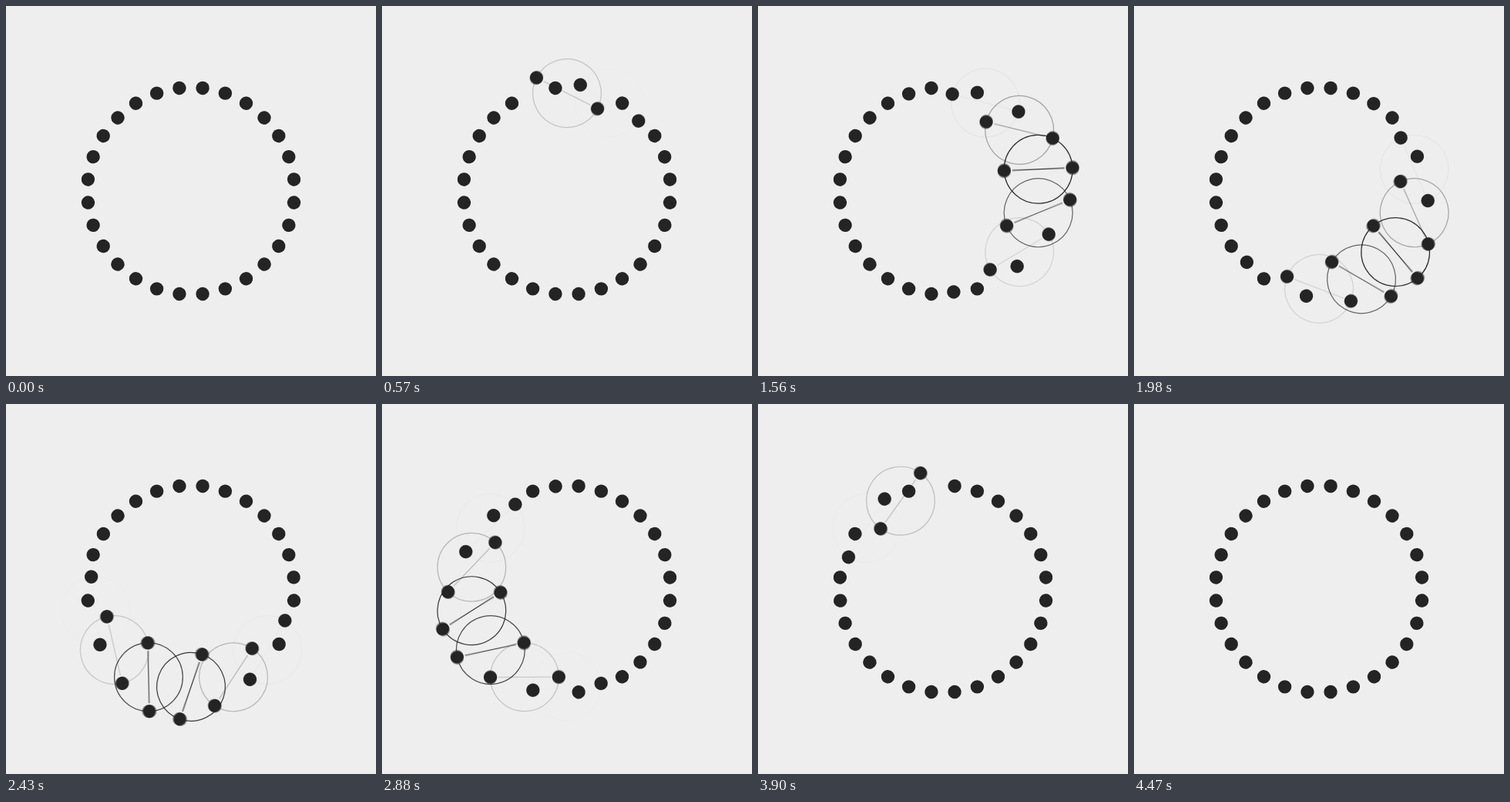
An HTML page with a canvas for the animation above (5.17 s loop, 480 by 480 pixels).

```html
<!DOCTYPE html>
<html>
<head>
<meta charset="utf-8">
<title>Swapping dots</title>
<style>
  html, body { margin: 0; width: 100%; height: 100%; overflow: hidden; background: #eee; }
  canvas { display: block; }
</style>
</head>
<body>
<canvas id="stage" width="480" height="480"></canvas>
<script>
const SIZE = 480, INK = '#242424', PAPER = '#eee';
const LOOP = 5170, STEP = 30, LAST = 4470;       // ms
const PAIRS = 14, TURN = 1800, STAGGER = 2700 / (PAIRS - 1);
const SHUTTER = 18, SAMPLES = 6;                 // motion blur
const RING = 134.4, DOT = 8.7;
const HALF_ANGLE = 3 * Math.PI / 28;             // paired dots are three places apart
const ORBIT = RING * Math.sin(HALF_ANGLE);
const HUB = RING * Math.cos(HALF_ANGLE);

const stage = document.getElementById('stage').getContext('2d');
const layer = document.createElement('canvas');
layer.width = layer.height = SIZE;
const ctx = layer.getContext('2d');

const smooth = p => p * p * (3 - 2 * p);
const clamp = p => Math.min(1, Math.max(0, p));

function circle(x, y, r) {
  ctx.beginPath();
  ctx.arc(x, y, r, 0, 2 * Math.PI);
}

function drawPair(i, time) {
  const turn = smooth(smooth(clamp((time - i * STAGGER) / TURN)));
  ctx.save();
  ctx.translate(SIZE / 2, SIZE / 2);
  ctx.rotate(i * 2 * Math.PI / PAIRS);
  ctx.translate(0, -HUB);
  ctx.rotate(turn * Math.PI);

  ctx.globalAlpha = Math.sin(turn * Math.PI) ** 2;
  circle(0, 0, ORBIT);
  ctx.stroke();
  ctx.beginPath();
  ctx.moveTo(-ORBIT + 10.5, 0);
  ctx.lineTo(ORBIT - 10.5, 0);
  ctx.stroke();

  ctx.globalAlpha = 1;
  for (const side of [-1, 1]) {
    circle(side * ORBIT, 0, DOT);
    ctx.fill();
  }
  ctx.restore();
}

function drawScene(time) {
  ctx.fillStyle = PAPER;
  ctx.fillRect(0, 0, SIZE, SIZE);
  ctx.fillStyle = ctx.strokeStyle = INK;
  ctx.lineWidth = 1.2;
  for (let i = 0; i < PAIRS; i++) drawPair(i, time);
}

function tick() {
  // look ahead by half a display refresh
  const now = (performance.now() + 8) % LOOP;
  const time = Math.min(LAST, Math.floor(now / STEP) * STEP);
  for (let k = 0; k < SAMPLES; k++) {
    drawScene(time + SHUTTER * (k + 0.5) / SAMPLES);
    stage.globalAlpha = 1 / (k + 1);
    stage.drawImage(layer, 0, 0);
  }
  requestAnimationFrame(tick);
}
tick();
</script>
</body>
</html>
```
